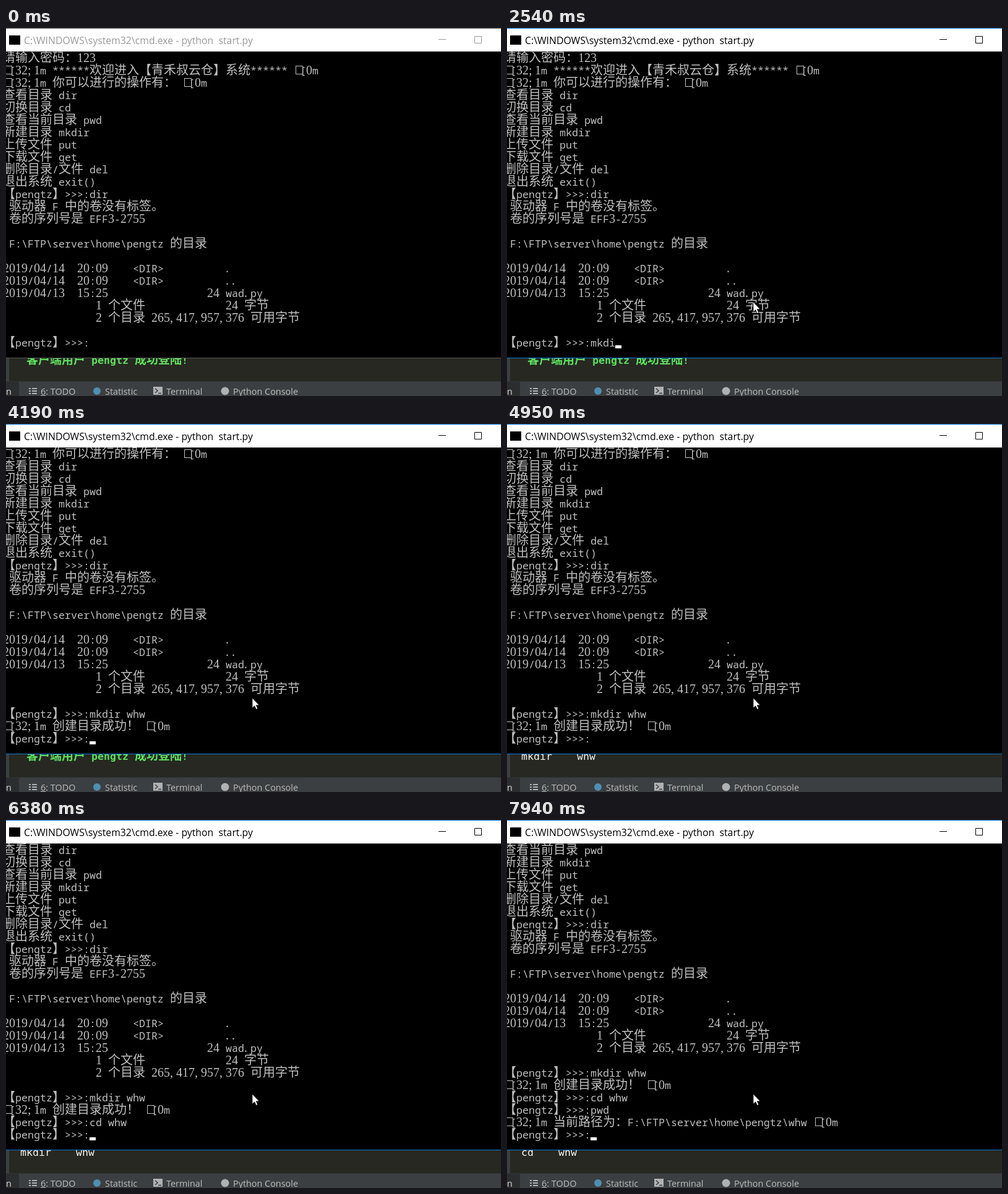
Write an HTML page that moves like this. It is 800x595 px and loops after 8 s.

```html
<!DOCTYPE html>
<html lang="zh-CN">
<head>
<meta charset="utf-8">
<title>Terminal session</title>
<style>
  html, body { margin: 0; width: 100%; height: 100%; overflow: hidden; background: #000; }
  svg { display: block; width: 100vw; height: 100vh; }
  text { white-space: pre; }
  .ui { font: 14.4px "Open Sans", "Noto Sans", sans-serif; fill: #bbb; }
  .title { font: 15.8px "Open Sans", "Noto Sans", sans-serif; }
  .cjk { font: 300 20px "Noto Sans CJK SC", "Noto Sans CJK", sans-serif; }
  .num { font: 20px "Liberation Serif", serif; }
  .mono { font: 300 16.667px "Noto Sans Mono", "Liberation Mono", monospace; }
  .echo { font: 16.6px "DejaVu Sans Mono", monospace; fill: #f8f8f2; }
  .login { font-weight: bold; fill: #5fe05f; }
  .login .cjk { font-weight: bold; font-size: 19px; }
</style>
</head>
<body>
<svg viewBox="0 0 800 595" preserveAspectRatio="none">
  <defs>
    <clipPath id="screen"><path d="M0 38H800V533H0z"/></clipPath>
    <clipPath id="panel"><path d="M0 534H800V571H0z"/></clipPath>
  </defs>

  <rect width="800" height="595" fill="#3c3f41"/>
  <rect x="5" y="534" width="795" height="37" fill="#272822"/>
  <g clip-path="url(#panel)">
    <text id="login" class="echo login" y="543"><tspan class="cjk" x="33">客户端用户</tspan><tspan x="138">pengtz</tspan><tspan class="cjk" x="208">成功登陆</tspan><tspan x="284">!</tspan></text>
    <text id="echo" class="echo" x="23" y="543"></text>
  </g>
  <path d="M0 571.5H800" stroke="#323435"/>

  <rect y="572" width="21" height="23" fill="#2b2d2e"/>
  <g class="ui">
    <text x="0" y="593" fill="#ddd">n</text>
    <path d="M37 583h3m2 0h8M37 587h3m2 0h8M37 591h3m2 0h8" stroke="#afb1b3" stroke-width="2"/>
    <text x="56" y="593"><tspan text-decoration="underline">6</tspan>: TODO</text>
    <circle cx="147" cy="587" r="6" fill="#4f8fb3"/>
    <text x="160" y="593">Statistic</text>
    <rect x="238" y="580" width="15" height="13" fill="#afb1b3"/>
    <path d="M241 583l4 3.5-4 3.5M246 590.5h5" fill="none" stroke="#3c3f41" stroke-width="1.5"/>
    <text x="259" y="593">Terminal</text>
    <circle cx="354" cy="587" r="6.5" fill="#afb1b3"/>
    <text x="367" y="593">Python Console</text>
  </g>

  <rect width="800" height="38" fill="#fff"/>
  <rect x="5" y="12" width="18" height="15" fill="#000"/>
  <text id="title" class="title" x="29" y="25.5">C:\WINDOWS\system32\cmd.exe - python  start.py</text>
  <path id="buttons" d="M699 18.5h12M757.5 13.5h11v11h-11z" fill="none"/>

  <rect y="38" width="800" height="495" fill="#000"/>
  <path id="border" d="M0 .5H800M0 533.5H800"/>
  <g clip-path="url(#screen)" fill="#c0c0c0">
    <g id="log"></g>
    <g id="prompt"></g>
    <rect id="caret" y="513" width="10" height="5" fill="#fff"/>
  </g>
  <path id="mouse" d="M0 0V16.2L3.8 12.7 6.3 18.4 8.8 17.3 6.3 11.8H11.2z" fill="#fff" stroke="#000" stroke-width=".7"/>
</svg>
<script>
const LOOP = 8000, CELL = 10, LINE = 20, LEFT = -5, TOP = 38, LAST = 23;
const ACTIVATE = 660;
const $ = id => document.getElementById(id);
const USER = 'pengtz';
const PROMPT = `【${USER}】>>>:`;
const HOME = 'F:\\FTP\\server\\home\\' + USER;
const ESC = '\x1b';
const green = s => `${ESC}[32;1m ${s} ${ESC}[0m`;
const gap = n => ' '.repeat(n);

const lines = [
  '请输入密码：123',
  green('******欢迎进入【青禾叔云仓】系统******'),
  green('你可以进行的操作有：'),
  '查看目录 dir',
  '切换目录 cd',
  '查看当前目录 pwd',
  '新建目录 mkdir',
  '上传文件 put',
  '下载文件 get',
  '删除目录/文件 del',
  '退出系统 exit()',
  PROMPT + 'dir',
  ' 驱动器 F 中的卷没有标签。',
  ' 卷的序列号是 EFF3-2755',
  '',
  ` ${HOME} 的目录`,
  '',
  `2019/04/14  20:09    <DIR>${gap(10)}.`,
  `2019/04/14  20:09    <DIR>${gap(10)}..`,
  `2019/04/13  15:25${gap(16)}24 wad.py`,
  `${gap(15)}1 个文件${gap(13)}24 字节`,
  `${gap(15)}2 个目录 265,417,957,376 可用字节`,
  '',
  PROMPT + 'mkdir whw',
  green('创建目录成功！'),
  PROMPT + 'cd whw',
  PROMPT + 'pwd',
  green(`当前路径为：${HOME}\\whw`)
];

// time, typed text, caret shown, lines scrolled off, echo in the panel behind
const MK = 'mkdir    whw', CD = 'cd    whw';
const steps = [
  [0, '', 0, 0, ''],
  [1300, '', 1, 0, ''],
  [1480, 'm', 1, 0, ''],
  [1660, 'mk', 1, 0, ''],
  [1840, 'mk', 0, 0, ''],
  [2240, 'mkd', 1, 0, ''],
  [2540, 'mkdi', 1, 0, ''],
  [2710, 'mkdir', 1, 0, ''],
  [2820, 'mkdir ', 1, 0, ''],
  [2930, 'mkdir ', 0, 0, ''],
  [3410, 'mkdir ', 1, 0, ''],
  [3790, 'mkdir w', 1, 0, ''],
  [3865, 'mkdir wh', 1, 0, ''],
  [3940, 'mkdir whw', 1, 0, ''],
  [4190, '', 1, 2, ''],
  [4420, '', 1, 2, MK],
  [4950, '', 0, 2, MK],
  [5350, 'c', 1, 2, MK],
  [5460, 'cd', 1, 2, MK],
  [5570, 'cd ', 1, 2, MK],
  [5670, 'cd ', 0, 2, MK],
  [5990, 'cd w', 1, 2, MK],
  [6080, 'cd wh', 1, 2, MK],
  [6180, 'cd whw', 1, 2, MK],
  [6380, '', 1, 3, MK],
  [6610, '', 1, 3, CD],
  [7080, '', 0, 3, CD],
  [7460, 'p', 1, 3, CD],
  [7610, 'pw', 1, 3, CD],
  [7760, 'pwd', 1, 3, CD],
  [7940, '', 1, 5, CD]
];

function add(parent, tag, attrs, text) {
  const el = document.createElementNS('http://www.w3.org/2000/svg', tag);
  for (const k in attrs) el.setAttribute(k, attrs[k]);
  if (text) el.textContent = text;
  return parent.appendChild(el);
}

// Places runs on the console grid; wide characters take two cells.
function writeLine(parent, str, row) {
  const g = add(parent, 'g', {});
  const y = TOP + row * LINE;
  let x = LEFT;
  for (const [run] of str.matchAll(/[\u3000-\uffef]+|\x1b| +|\d+|[.,;]|[!-+\-\/:<-~]+/g)) {
    const wide = run >= '\u3000';
    if (run === ESC) {
      add(g, 'rect', { x: x + 3.5, y: y + 3.5, width: 11, height: 13, fill: 'none', stroke: '#c0c0c0' });
    } else if (run[0] !== ' ') {
      const cls = wide ? 'cjk' : /^[\d.,;]/.test(run) ? 'num' : 'mono';
      add(g, 'text', { x, y: y + 17, class: cls }, run);
    }
    x += run.length * CELL * (wide ? 2 : 1);
  }
  return g;
}

const rows = lines.map((s, i) => writeLine($('log'), s, i));
const promptEnd = LEFT + (PROMPT.length + 2) * CELL;
let shown = null;

function showStep(step) {
  if (step === shown) return;
  shown = step;
  const [, typed, caret, scroll, echo] = step;
  rows.forEach((r, i) => r.style.display = i < scroll || i >= scroll + LAST ? 'none' : '');
  $('log').setAttribute('transform', `translate(0 ${-scroll * LINE})`);
  $('prompt').replaceChildren();
  writeLine($('prompt'), PROMPT + typed, LAST);
  $('caret').setAttribute('x', promptEnd + typed.length * CELL);
  $('caret').style.display = caret ? '' : 'none';
  $('login').style.display = echo ? 'none' : '';
  $('echo').textContent = echo;
}

function render(t) {
  showStep(steps.findLast(s => s[0] <= t));

  const active = t >= ACTIVATE;
  $('border').setAttribute('stroke', active ? '#0078d7' : '#555');
  $('title').setAttribute('fill', active ? '#000' : '#999');
  $('buttons').setAttribute('stroke', active ? '#000' : '#999');

  const p = Math.min(1, Math.max(0, (t - 290) / 370));
  const left = (1 - p) ** 2;
  $('mouse').style.display = t < 290 ? 'none' : '';
  $('mouse').setAttribute('transform', `translate(${398 + 40 * left} ${443 + 105 * left})`);
}

const start = performance.now();
function tick() {
  render((performance.now() - start) % LOOP);
  requestAnimationFrame(tick);
}
tick();
</script>
</body>
</html>
```
